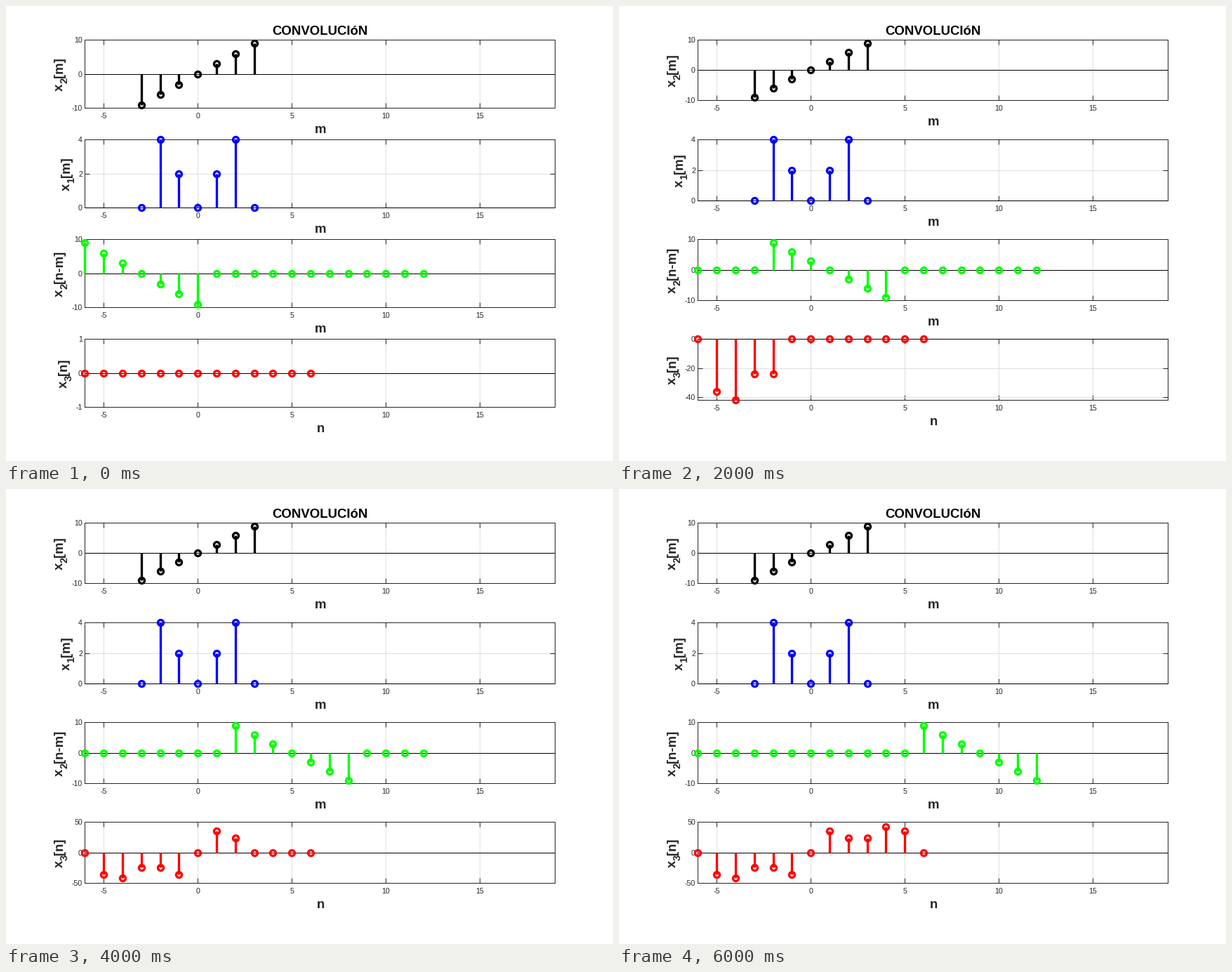
Write a matplotlib script that moves like this. It is 865x648 px and loops after 6500 ms.

```python
import numpy as np
import matplotlib.pyplot as plt
from matplotlib.animation import FuncAnimation

W, H = 865, 648
DPI = 72  # one point is one pixel
LEFT, RIGHT = 112.45, 782.45
TOPS = [48.45, 190.45, 332.45, 474.45]
INK = "#262626"
LABEL_SIZE = 18.67
TICK_SIZE = 10.67
# advance widths in em
ADVANCE = {"x": 0.556, "1": 0.556, "2": 0.556, "3": 0.556, "[": 0.333,
           "]": 0.333, "m": 0.889, "n": 0.611, "-": 0.333}

plt.rcParams["font.family"] = "Liberation Sans"
plt.rcParams["axes.unicode_minus"] = False

k = np.arange(-3, 4)
x1 = np.array([0, 4, 2, 0, 2, 4, 0])
x2 = 3 * k
x3 = np.convolve(x1, x2)
m_axis = np.arange(-6, 13)
n_axis = np.arange(-6, 7)

fig = plt.figure(figsize=(W / DPI, H / DPI), dpi=DPI, facecolor="white")


def put(x, y, text, size=LABEL_SIZE, color=INK, **kw):
    """Bold text at pixel coordinates measured from the top left."""
    fig.text(x, H - y, text, transform=None, fontsize=size, color=color,
             weight="bold", va="baseline", **kw)


def y_label(x, y, index, arg):
    """Vertical label x_index[arg] centred on y, with its baseline at x."""
    parts = [("x", 1, 0), (index, 0.8, 6.5), (f"[{arg}]", 1, 0)]
    widths = [sum(ADVANCE[c] for c in s) * f * LABEL_SIZE for s, f, _ in parts]
    y += sum(widths) / 2
    for (s, f, drop), w in zip(parts, widths):
        put(x + drop, y, s, LABEL_SIZE * f, rotation=90, ha="left",
            rotation_mode="anchor")
        y -= w


def panel(top, bottom, x, y, color, ylim, yticks, index, arg, var, label_x):
    ax = fig.add_axes([LEFT / W, 1 - bottom / H, (RIGHT - LEFT) / W,
                       (bottom - top) / H])
    ax.set(xlim=(-6, 19), ylim=ylim, xticks=range(-5, 16, 5), yticks=yticks)
    ax.set_axisbelow(True)
    ax.grid(color="#dfdfdf", linewidth=1)
    ax.tick_params(direction="in", top=True, right=True, length=6.7, width=1,
                   color=INK, labelcolor=INK, labelsize=TICK_SIZE)
    ax.tick_params(axis="x", pad=6.7)
    ax.tick_params(axis="y", pad=3.5)
    for spine in ax.spines.values():
        spine.set(linewidth=1, edgecolor=INK)
    ax.axhline(0, color="black", linewidth=1, zorder=2.6, clip_on=False)
    ax.vlines(x, 0, y, color=color, linewidth=3.33, zorder=3, clip_on=False)
    ax.plot(x, y, "o", markersize=8, markerfacecolor="none",
            markeredgecolor=color, markeredgewidth=3.33, zorder=4,
            clip_on=False)
    put((LEFT + RIGHT) / 2 + 0.5, bottom + 35.5, var, ha="center")
    y_label(label_x, (top + bottom) / 2, index, arg)


def result_scale(frame):
    """Limits and ticks of the bottom panel."""
    if frame == 0:
        return (-1, 1), [-1, 0, 1]
    if frame == 1:
        return (-40, 0), [-40, -20, 0]
    if frame < 7:
        return (-42, 0), [-40, -20, 0]
    return (-50, 50), [-50, 0, 50]


def draw(frame):
    fig.clear()
    first = frame == 0
    heights = [97] * 4 if first else [86, 87, 87, 87]
    boxes = [(t, t + h) for t, h in zip(TOPS, heights)]
    ten = ((-10, 10), [-10, 0, 10])

    shifted = np.zeros(len(m_axis))
    shifted[frame:frame + 7] = x2[::-1]
    result = np.where(n_axis <= frame - 6, x3, 0)

    put(447.5, 41, "CONVOLUCIóN", color="black", ha="center")
    panel(*boxes[0], k, x2, "black", *ten, "2", "m", "m", 81)
    panel(*boxes[1], k, x1, "blue", (0, 4), [0, 2, 4], "1", "m", "m", 90.5)
    panel(*boxes[2], m_axis, shifted, "lime", *ten, "2", "n-m", "m", 81)
    panel(*boxes[3], n_axis, result, "red", *result_scale(frame), "3", "n",
          "n", 87 if first else 81)
    return []


anim = FuncAnimation(fig, draw, frames=13, interval=500, repeat=True,
                     repeat_delay=0, init_func=lambda: [], blit=False)
plt.show()
```
